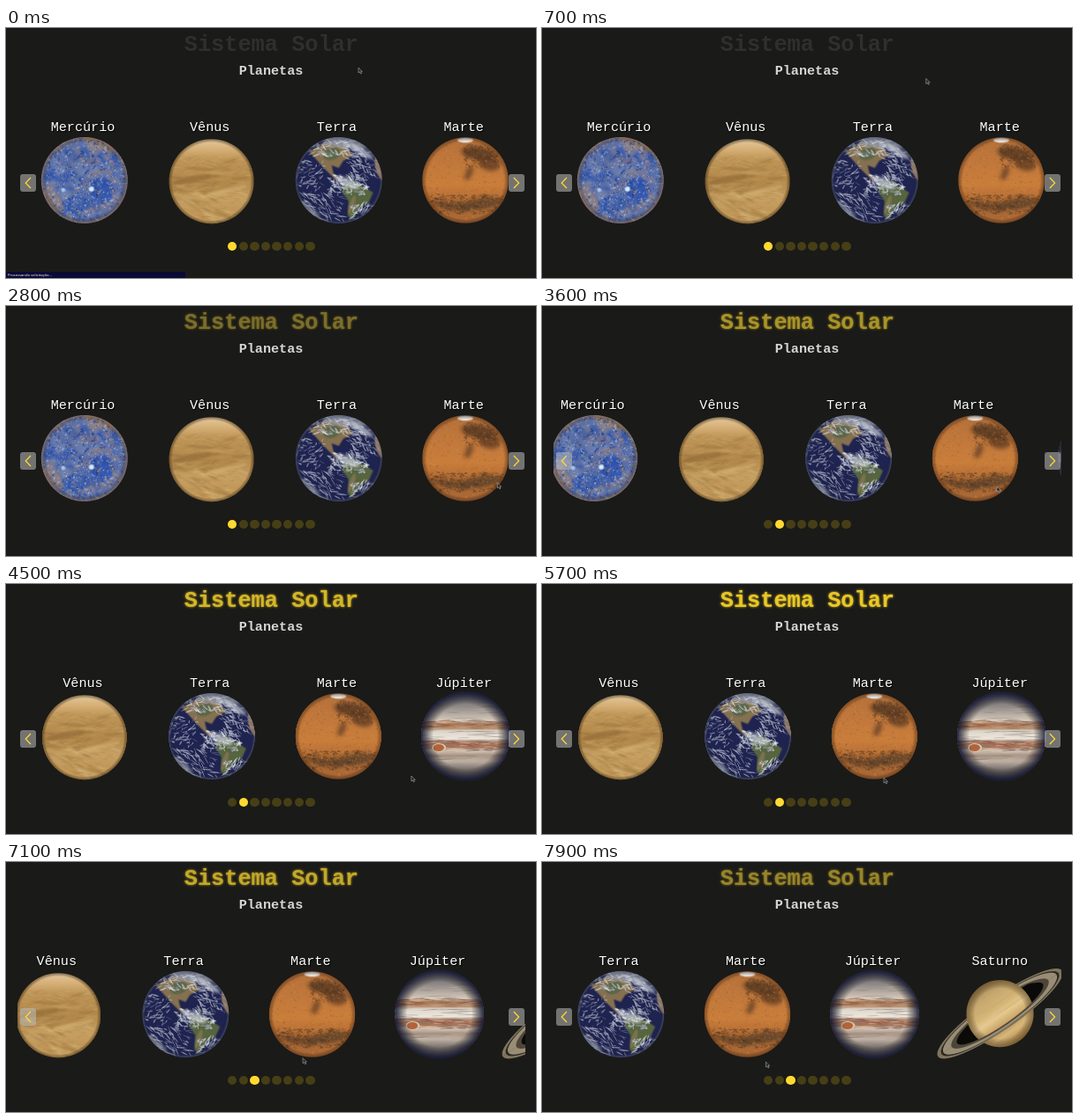
Write an HTML page with a canvas that moves like this. It is 600 px wide and 284 px high and loops after 8000 ms.

```html
<!DOCTYPE html>
<html lang="pt">
<head>
<meta charset="utf-8">
<style>
  html, body { margin: 0; width: 100%; height: 100%; overflow: hidden; background: #1a1a18; }
  #stage { position: relative; width: 600px; height: 284px; overflow: hidden; text-align: center;
    font: 15.15px/18px "Liberation Mono", monospace; color: #fff; }
  #stage div, #stage canvas, #stage svg { position: absolute; }
  #title { left: .4px; top: 5px; width: 600px; font-size: 25.3px; line-height: 30px; font-weight: bold; }
  #sub { left: 0; top: 40px; width: 600px; font-weight: bold; color: #d6d6d4; }
  #view { left: 13px; top: 0; width: 575px; height: 284px; overflow: hidden; }
  .slide { top: 104px; width: 180px; height: 124px; text-shadow: 1px 1px 1px #000; }
  .slide canvas { left: 0; top: 14px; width: 180px; height: 110px; }
  .arrow { top: 166px; width: 18.2px; height: 20px; border-radius: 3px; background: rgba(190,190,190,.55); }
  .arrow svg { left: 0; top: 0; }
  .dot { top: 242.7px; width: 10.4px; height: 10.4px; border-radius: 50%; }
  #status { left: 0; top: 277px; width: 203px; height: 7px; background: #0b0a35;
    font: 4.2px/7px "Open Sans", sans-serif; text-align: left; text-indent: 2px; }
  #cursor { left: 0; top: 0; }
</style>
</head>
<body>
<div id="stage">
  <div id="title">Sistema Solar</div>
  <div id="sub">Planetas</div>
  <div id="view"></div>
  <div class="arrow" style="left:15.8px"><svg width="19" height="20"><path d="M12 4L6.2 10L12 16" fill="none" stroke="#ffdb30" stroke-width="1.2"/></svg></div>
  <div class="arrow" style="left:569.3px"><svg width="19" height="20"><path d="M5.8 4L11.6 10L5.8 16" fill="none" stroke="#ffdb30" stroke-width="1.2"/></svg></div>
  <div id="status">Processando solicitação...</div>
  <svg id="cursor" width="8" height="10"><path d="M1 1V7L2.5 5.8L3.6 8L4.6 7.5L3.6 5.4H5.4Z" fill="#222" stroke="#aaa" stroke-width=".6"/></svg>
</div>
<script>
const $ = id => document.getElementById(id);
const LOOP = 8000, PITCH = 143.75;
let g, seed = 1;

function rnd() {
  seed = (seed * 16807) % 2147483647;
  return seed / 2147483647;
}
const span = (a, b) => a + (b - a) * rnd();
const pick = list => list[Math.floor(rnd() * list.length)];

function blob(color, x, y, rx, ry = rx, rot = 0) {
  g.fillStyle = color;
  g.beginPath();
  g.ellipse(x, y, rx, ry, rot, 0, 7);
  g.fill();
}
function poly(color, pts) {
  g.fillStyle = color;
  g.beginPath();
  for (let i = 0; i < pts.length; i += 2) g.lineTo(pts[i], pts[i + 1]);
  g.fill();
}
// n random ellipses inside a box
function scatter(n, colors, [x0, y0, x1, y1], w, h, rot = 0, alpha = .5, wobble = .25) {
  g.globalAlpha = alpha;
  for (let i = 0; i < n; i++)
    blob(pick(colors), span(x0, x1), span(y0, y1), span(w / 3, w), span(h / 3, h), rot + span(-wobble, wobble));
  g.globalAlpha = 1;
}
function gradient(grad, stops) {
  stops.forEach(([at, color]) => grad.addColorStop(at, color));
  return grad;
}
function vertical(r, stops) {
  g.fillStyle = gradient(g.createLinearGradient(0, -r, 0, r), stops);
  g.fillRect(-r, -r, 2 * r, 2 * r);
}
function soften(px) { g.filter = px ? `blur(${px}px)` : 'none'; }
function globe(x, y, r, limb, edge, paint) {
  g.save();
  g.translate(x, y);
  g.beginPath();
  g.arc(0, 0, r, 0, 7);
  g.clip();
  paint(r);
  soften(0);
  g.fillStyle = gradient(g.createRadialGradient(0, 0, r * edge, 0, 0, r), [[0, 'transparent'], [1, limb]]);
  g.fillRect(-r, -r, 2 * r, 2 * r);
  g.restore();
}

const planets = {
  'Mercúrio': () => globe(1.8, 0, 49, 'rgba(150,115,90,.7)', .88, r => {
    const all = [-r, -r, r, r];
    blob('#5a70a8', 0, 0, r);
    soften(2);
    scatter(90, ['#2450b4', '#7c8db8', '#94827f', '#37529a', '#8b7f8d'], all, 10, 6, .6, .5, 1);
    g.globalAlpha = .6;
    blob('#1e4bb6', 20, 12, 13, 15);
    blob('#2854b2', -8, 27, 17, 9);
    blob('#a58260', 18, -42, 20, 7, .4);
    blob('#a08675', -35, 23, 8, 16, -.6);
    soften(0);
    scatter(900, ['#1c46b0', '#a9bde4', '#b08d76', '#26376e', '#6f8bcc', '#7d6a70'], all, 2.2, 1.1, 0, .55, 3);
    scatter(150, ['#d5e2f5', '#d0b795'], all, 1, .7, 0, .75, 3);
    soften(1.5);
    blob('#d6efff', 8, 10, 3);
    blob('#a8c8ee', -24, 11, 2.5);
  }),
  'Vênus': () => globe(1.6, 1.2, 48, 'rgba(70,45,15,.55)', .92, r => {
    vertical(r, [[0, '#e4caa0'], [.12, '#d6b077'], [.24, '#bf9658'], [.5, '#b48a4c'], [.72, '#c69f62'], [1, '#b98e4e']]);
    soften(2);
    scatter(40, ['#96703b', '#caa468', '#a37a41'], [-r, -25, r, 12], 18, 2, -.15, .45);
    scatter(36, ['#dabb83', '#a07a43', '#d0a96a'], [-r, 5, r, r], 18, 2, .4, .5);
    g.globalAlpha = .6;
    blob('#d8b478', 14, 12, 27, 3, -.25);
    blob('#906a37', -22, -2, 23, 4, -.2);
    g.globalAlpha = 1;
    soften(0);
    scatter(250, ['#8f6a36', '#dcbd86'], [-r, -30, r, r], 6, .6, 0, .22, .5);
  }),
  'Terra': () => globe(1.7, 0, 49, 'rgba(95,105,140,.6)', .9, r => {
    blob('#1f2350', 0, 0, r);
    soften(1.5);
    poly('#857150', [-34, -33, -14, -43, 9, -38, 16, -28, 5, -22, 0, -14, -8, -17, -6, -8, 4, 1, -4, -1, -16, -13, -24, -22]);
    blob('#5d6648', -8, -30, 10, 7, -.3);
    poly('#56653f', [5, 2, 17, 0, 28, 7, 39, 14, 34, 25, 23, 32, 15, 45, 10, 40, 11, 24, 4, 13]);
    blob('#7c724e', 15, 28, 3, 11, .3);
    blob('#b59168', 46, -14, 4, 14, -.25);
    soften(3);
    g.globalAlpha = .75;
    blob('#b5b9bd', 7, -43, 26, 6, .15);
    blob('#c3c7d0', 26, -33, 15, 4, .55);
    blob('#aab0bd', -33, 33, 15, 3, .7);
    blob('#c5c9d0', 10, 3, 15, 5, .4);
    soften(.7);
    const white = ['#eef0f3', '#c3c9d3', '#9099b0'];
    scatter(120, white, [-34, -47, 38, -27], 5, 1, .3, .5, .8);
    scatter(120, white, [-12, -6, 32, 16], 4, 1.2, .5, .55, 1.2);
    scatter(90, white, [-45, 16, 5, 46], 6, .9, .6, .5, .6);
    scatter(70, white, [8, -26, 46, -2], 5, .8, .45, .5, .8);
    scatter(70, white, [-47, -22, -16, 14], 4, .9, -.4, .45, 1);
    scatter(60, white, [14, 26, 40, 44], 5, .9, -.5, .5, .8);
  }),
  'Marte': () => globe(2, 0, 48.7, 'rgba(80,40,15,.5)', .9, r => {
    vertical(r, [[0, '#b4713b'], [.25, '#c0773b'], [.55, '#c97e3b'], [.75, '#b26b33'], [1, '#a96938']]);
    soften(5);
    g.globalAlpha = .8;
    blob('#553924', 15, -30, 20, 8, .2);
    blob('#633e24', 27, -20, 13, 9, .3);
    blob('#6b4328', 4, -8, 4, 9, .4);
    blob('#64442a', -16, 29, 22, 5, .15);
    blob('#57402b', 17, 27, 25, 6, -.15);
    soften(0);
    scatter(260, ['#4d3422', '#6a4527'], [-40, 16, 43, 38], 2.5, 1, .1, .45, .6);
    scatter(170, ['#58391f', '#4a321f'], [-2, -40, 38, -14], 2, 1.2, .3, .35, 1);
    scatter(500, ['#dc924e', '#8f5622'], [-r, -r, r, r], 1.6, .9, 0, .3, 3);
    soften(1);
    blob('#f1eeea', 0, -45.5, 9, 2.7);
  }),
  'Júpiter': () => globe(2, 0, 50.5, 'rgba(16,20,52,.9)', .72, r => {
    vertical(r, [[0, '#626270'], [.16, '#8d8887'], [.27, '#bfb3a8'], [.33, '#d8cdbf'], [.36, '#a97653'],
      [.41, '#b68a69'], [.44, '#ded7cc'], [.53, '#ece6dc'], [.56, '#a67b67'], [.62, '#ad7558'],
      [.66, '#d3c6b6'], [.72, '#a48e80'], [.78, '#bfb2a4'], [.86, '#827a75'], [1, '#565460']]);
    soften(.7);
    scatter(90, ['#8c4f37', '#d3a77d', '#77665f'], [-r, -18, r, -9], 9, .8, 0, .5, .12);
    scatter(90, ['#8a4933', '#d9c0a3', '#7d6968'], [-r, 5, r, 16], 9, .8, 0, .5, .12);
    scatter(120, ['#776d6a', '#d3cabe', '#998778'], [-r, -45, r, 45], 14, .6, 0, .4, .08);
    blob('#d2c3ac', -30, 13, 8, 5);
    blob('#b3633a', -30.5, 13, 6, 4);
  }),
  'Saturno': () => {
    const tilt = -.607;
    const rings = (from, to) => {
      g.save();
      g.rotate(tilt);
      [[66, 14, '#4d463a'], [73, 13, '#9a8d75'], [83, 5, '#80765f'], [78.6, 1.6, '#26231c']].forEach(([a, w, color]) => {
        g.save();
        g.scale(1, .22);
        g.strokeStyle = color;
        g.lineWidth = w;
        g.beginPath();
        g.arc(0, 0, a, from, to);
        g.stroke();
        g.restore();
      });
      g.restore();
    };
    g.translate(0, -.8);
    blob('#0b0a08', 0, 0, 61, 13, tilt);
    rings(Math.PI, 2 * Math.PI);
    blob('#0b0a08', 31, -25, 14, 7, tilt);
    globe(0, 0, 38, 'rgba(80,55,20,.55)', .75, r => {
      g.rotate(tilt);
      vertical(r, [[0, '#a98a59'], [.2, '#c7a86f'], [.4, '#d5b577'], [.52, '#e6ca91'], [.66, '#cba566'], [.82, '#d8b67a'], [1, '#b18a4d']]);
      soften(1);
      scatter(24, ['#e5cb98', '#b58f53'], [-r, -r, r, r], 32, .8, 0, .2, .03);
    });
    rings(0, Math.PI);
  }
};

Object.entries(planets).forEach(([name, paint], i) => {
  const slide = document.createElement('div'), c = document.createElement('canvas');
  slide.className = 'slide';
  slide.style.left = 74 + i * PITCH - 90 + 'px';
  slide.append(name, c);
  c.width = 360;
  c.height = 220;
  g = c.getContext('2d');
  g.scale(2, 2);
  g.translate(90, 55);
  seed = 1234 + i * 777;
  paint();
  $('view').append(slide);
});

const slides = [...document.querySelectorAll('.slide')];
const dots = Array.from({ length: 8 }, (_, i) => {
  const d = document.createElement('div');
  d.className = 'dot';
  d.style.left = 250.9 + i * 12.63 + 'px';
  $('stage').append(d);
  return d;
});

// cubic-bezier(.25, .1, .25, 1)
function ease(x) {
  if (x <= 0) return 0;
  if (x >= 1) return 1;
  let lo = 0, hi = 1, s;
  for (let i = 0; i < 20; i++) {
    s = (lo + hi) / 2;
    if (.75 * s * (1 - s) + s ** 3 < x) lo = s; else hi = s;
  }
  return .3 * s * (1 - s) ** 2 + 3 * s * s * (1 - s) + s ** 3;
}

// the carousel advances by itself every 3.5 s
const moves = [3521, 7021];
const path = [[0, 398, 44], [600, 398, 44], [1100, 575, 105], [1500, 496, 134], [1600, 495, 135], [2300, 552, 186],
  [3200, 558, 211], [3600, 514, 204], [4100, 531, 225], [4500, 458, 217], [5000, 394, 223],
  [5500, 386, 219], [6850, 386, 219], [7500, 254, 226], [8000, 252, 226]];

function cursorAt(t) {
  const i = path.findIndex(p => p[0] > t), [t0, x0, y0] = path[i - 1], [t1, x1, y1] = path[i];
  const k = (t - t0) / (t1 - t0);
  return [x0 + (x1 - x0) * k, y0 + (y1 - y0) * k];
}

function render(t) {
  const glow = t < 600 ? 0 : (1 - Math.cos(Math.PI * (t - 600) / 5000)) / 2;
  const mix = (a, b) => Math.round(a + (b - a) * glow);
  $('title').style.color = `rgb(${mix(47, 232)},${mix(48, 200)},${mix(44, 40)})`;
  $('title').style.textShadow = `0 0 3px rgba(255,213,40,${glow * .85})`;

  const shift = PITCH * moves.reduce((sum, m) => sum + ease((t - m) / 500), 0);
  slides.forEach(s => s.style.transform = `translateX(${-shift}px)`);
  const active = moves.filter(m => t >= m).length;
  dots.forEach((d, i) => d.style.background = i === active ? '#ffda30' : '#463f16');

  $('status').style.display = t < 600 ? '' : 'none';
  const [x, y] = cursorAt(t);
  $('cursor').style.transform = `translate(${x}px,${y}px)`;
}

const start = performance.now();
function tick() {
  render((performance.now() - start) % LOOP);
  requestAnimationFrame(tick);
}
tick();
</script>
</body>
</html>
```
